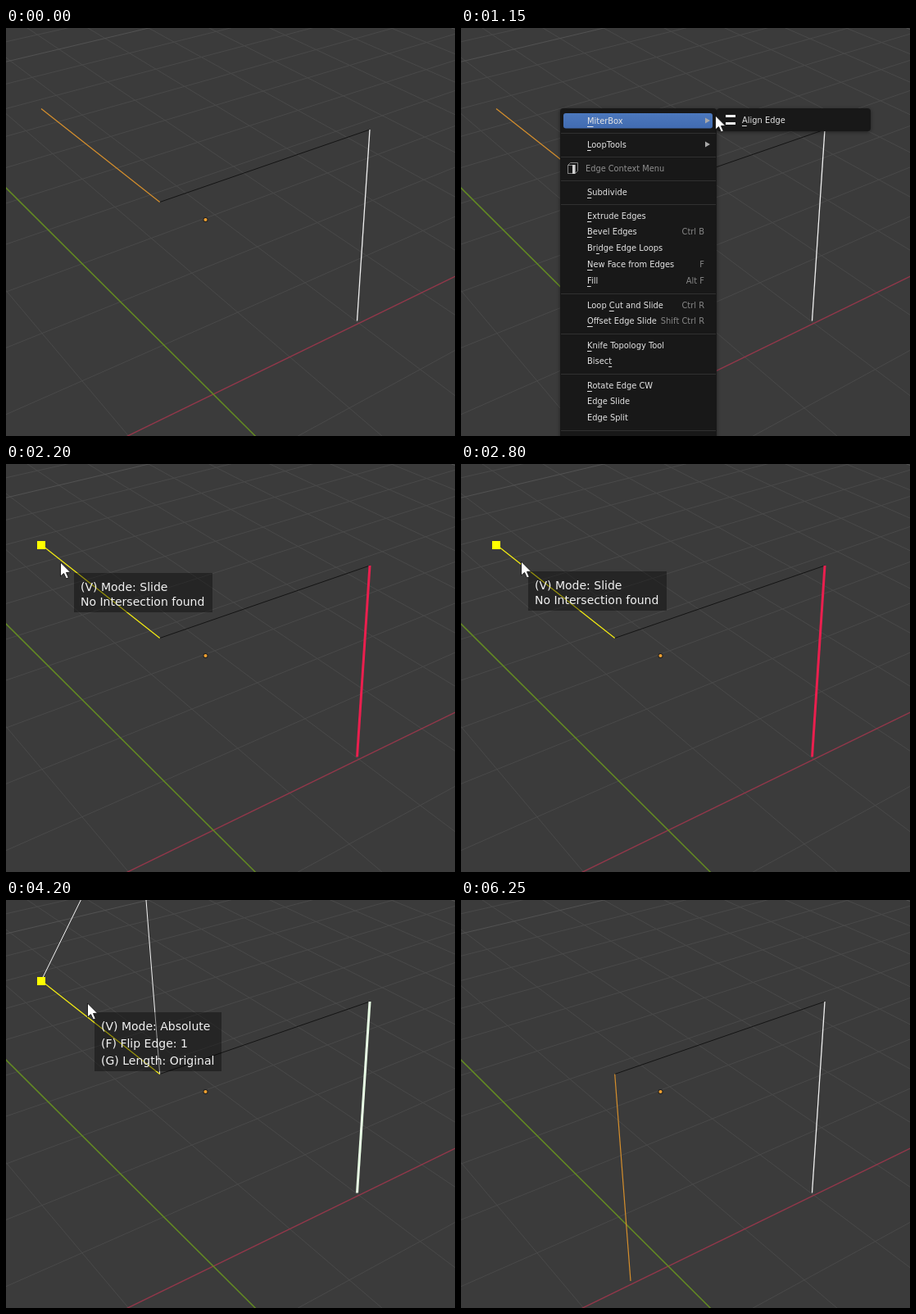
Write an HTML page with a canvas that moves like this. It is 548 by 498 pixels and loops after 6400 ms.

```html
<!DOCTYPE html>
<html>
<head>
<meta charset="utf-8">
<style>
html, body { margin: 0; width: 100%; height: 100%; overflow: hidden; background: #3b3b3b; }
canvas { display: block; }
</style>
</head>
<body>
<canvas id="stage" width="548" height="498"></canvas>
<script>
const ctx = document.getElementById('stage').getContext('2d');
const LOOP = 6400, STEP = 50;
const FONT = '"DejaVu Sans", sans-serif';

// Ends of the edges in the scene
const A = [43, 98.5], B = [187.7, 212.5], C = [444, 124], D = [428.5, 357.5];
const UP = [160, -140], DOWN = [207, 465];

const MENU_OPEN = 400, SUB_OPEN = 850, PICK = 1550, ABSOLUTE = 2900;
const FLIPS = [3700, 4050, 4450], CONFIRM = 5500;

// Pointer path: time, x, y
const PATH = [
  [100, 330, 500], [350, 220, 113], [900, 225, 113], [1150, 310, 107],
  [1400, 362, 112], [1600, 362, 116], [1700, 348, 127], [1750, 338, 134],
  [1950, 215, 138], [2100, 80, 122], [2200, 66, 120], [2350, 40, 84],
  [2500, 45, 90], [2650, 70, 118], [3250, 83, 122], [3500, 83, 122],
  [4500, 106, 127], [5600, 106, 127], [5900, 150, 225], [6200, 300, 500]
];

// Menu rows: y, label, index of the underlined letter, shortcut
const ROWS = [
  [113, 'MiterBox', 0], [142, 'LoopTools', 0], [200, 'Subdivide', 0],
  [229, 'Extrude Edges', 0], [248, 'Bevel Edges', 0, 'Ctrl B'],
  [268, 'Bridge Edge Loops', 2], [288, 'New Face from Edges', 0, 'F'],
  [308, 'Fill', 0, 'Alt F'], [338, 'Loop Cut and Slide', 5, 'Ctrl R'],
  [357, 'Offset Edge Slide', 0, 'Shift Ctrl R'], [387, 'Knife Topology Tool', 0],
  [406, 'Bisect', 5], [436, 'Rotate Edge CW', 0], [455, 'Edge Slide', 2],
  [475, 'Edge Split', -1]
];
const RULES = [128, 157, 186, 215, 324, 373, 422, 491];

function pointer(t) {
  for (let i = 1; i < PATH.length; i++) {
    const [t0, x0, y0] = PATH[i - 1], [t1, x1, y1] = PATH[i];
    if (t <= t1) {
      const k = Math.max(0, (t - t0) / (t1 - t0));
      return [Math.round(x0 + (x1 - x0) * k), Math.round(y0 + (y1 - y0) * k)];
    }
  }
  return [300, 520];
}

function line(color, width, ...points) {
  ctx.strokeStyle = color;
  ctx.lineWidth = width;
  ctx.beginPath();
  for (const p of points) ctx.lineTo(...p);
  ctx.stroke();
}

function box(color, x, y, w, h, r = 0) {
  ctx.fillStyle = color;
  ctx.beginPath();
  ctx.roundRect(x, y, w, h, r);
  ctx.fill();
}

function text(str, x, y, size, color, align = 'left') {
  ctx.font = `${size}px ${FONT}`;
  ctx.textAlign = align;
  ctx.fillStyle = color;
  ctx.fillText(str, x, y);
}

const handle = (color, [x, y]) => box(color, Math.round(x) - 5, Math.round(y) - 5, 10, 10);

// Ground plane point in perspective, from the two vanishing points
function ground(x, y) {
  const p = 0.053 * x, q = 0.0713 * y, w = 1 + p + q;
  return [(253 + 2107 * p - 655 * q) / w, (447 - 457 * (p + q)) / w];
}

function drawGrid() {
  for (let i = -4; i <= 16; i++) {
    if (!i) continue;
    const color = i % 10 ? '#494949' : '#525252';
    line(color, 1, ground(-5, i), ground(18, i));
    line(color, 1, ground(i, -5), ground(i, 18));
  }
  line('#93374a', 1.4, ground(-3, 0), ground(8, 0));
  line('#638a22', 1.5, ground(0, -3), ground(0, 8));
}

function drawScene(t) {
  const active = t >= PICK && t < CONFIRM, done = t >= CONFIRM;
  const slide = t < ABSOLUTE;
  const flips = FLIPS.filter(f => t >= f).length;
  const tip = flips % 2 ? DOWN : UP;

  line('#141414', 1, B, C);
  ctx.fillStyle = '#1d1d1d';
  ctx.beginPath(); ctx.arc(243.5, 234, 3, 0, 7); ctx.fill();
  ctx.fillStyle = '#f0a030';
  ctx.beginPath(); ctx.arc(243.5, 234, 2.1, 0, 7); ctx.fill();

  if (!active) {
    line('#f0f0f0', 1.3, C, D);
    line('#d68f2c', 1.2, B, done ? DOWN : A);
    return;
  }
  line(slide ? '#ea1f4e' : '#e9ffe6', 3, C, D);
  if (!slide) line('#f4f4f4', 1, A, tip, B);
  line('#f6ee10', 1.2, A, B);
  handle('#ffff00', t < 2000 ? B : A);
  if (!slide) handle('#ffffff', tip);

  const [px, py] = pointer(t - STEP);
  const x = px + 10, y = py + 12;
  const rows = slide
    ? ['(V) Mode: Slide', 'No Intersection found']
    : ['(V) Mode: Absolute', `(F) Flip Edge: ${tip === UP ? 1 : -1}`, '(G) Length: Original'];
  box('rgba(0,0,0,.38)', x, y, slide ? 169 : 155, slide ? 48 : 72);
  rows.forEach((row, i) => text(row, x + 8, y + 22 + i * (slide ? 18 : 21), 14, '#f2f2f2'));
}

function arrow(x, y) {
  ctx.fillStyle = '#a8a8a8';
  ctx.beginPath();
  ctx.moveTo(x, y - 3.5); ctx.lineTo(x + 6, y); ctx.lineTo(x, y + 3.5);
  ctx.fill();
}

function label(str, x, y, mark) {
  text(str, x, y + 4, 9.9, '#e4e4e4');
  if (mark < 0) return;
  const left = ctx.measureText(str.slice(0, mark)).width;
  ctx.fillRect(x + left, y + 7, Math.max(4, ctx.measureText(str[mark]).width - 1), 1);
}

function panel(x, y, w, h) {
  ctx.save();
  ctx.shadowColor = 'rgba(0,0,0,.45)';
  ctx.shadowBlur = 5;
  ctx.shadowOffsetY = 1;
  box('#181818', x, y, w, h, 4);
  ctx.restore();
}

function drawMenu(t) {
  panel(121, 98, 191, 420);
  const blue = ctx.createLinearGradient(0, 104, 0, 123);
  blue.addColorStop(0, '#4c78bd');
  blue.addColorStop(1, '#416bb0');
  box(blue, 125, 104, 182, 18.5, 3);
  for (const y of RULES) box('#303030', 122, y, 189, 1);
  for (const [y, name, mark, keys] of ROWS) {
    label(name, 154, y, mark);
    if (keys) text(keys, 297, y + 4, 9.9, '#868686', 'right');
  }
  arrow(298, 113);
  arrow(298, 142);

  text('Edge Context Menu', 152, 175, 9.8, '#909090');
  ctx.strokeStyle = '#858585';
  ctx.lineWidth = 1;
  ctx.strokeRect(130.5, 167.5, 9, 10);
  line('#858585', 1, [130.5, 167.5], [133.5, 164.5], [142.5, 164.5], [142.5, 174.5], [139.5, 177.5]);
  box('#d0d0d0', 136, 167, 3, 11);

  if (t < SUB_OPEN) return;
  panel(312, 98, 188, 28);
  box('#f0f0f0', 323, 106, 12, 3);
  box('#f0f0f0', 323, 115, 12, 3);
  label('Align Edge', 343, 112, 0);
}

function drawPointer([x, y]) {
  ctx.beginPath();
  for (const [dx, dy] of [[0, 0], [0, 17], [4, 13.5], [7, 20], [9.8, 18.8], [7, 12.5], [12.2, 12.2]])
    ctx.lineTo(x + dx + 0.5, y + dy);
  ctx.closePath();
  ctx.fillStyle = '#fff';
  ctx.fill();
  ctx.strokeStyle = '#111';
  ctx.lineWidth = 0.9;
  ctx.stroke();
}

function draw(now) {
  const t = Math.min(6250, Math.floor(now % LOOP / STEP) * STEP);
  box('#3b3b3b', 0, 0, 548, 498);
  drawGrid();
  drawScene(t);
  if (t >= MENU_OPEN && t < PICK) drawMenu(t);
  if (t >= 100 && t < 6250) drawPointer(pointer(t));
  requestAnimationFrame(loop);
}

let start;
function loop(now) {
  start ??= now;
  draw(now - start);
}
requestAnimationFrame(loop);
</script>
</body>
</html>
```
